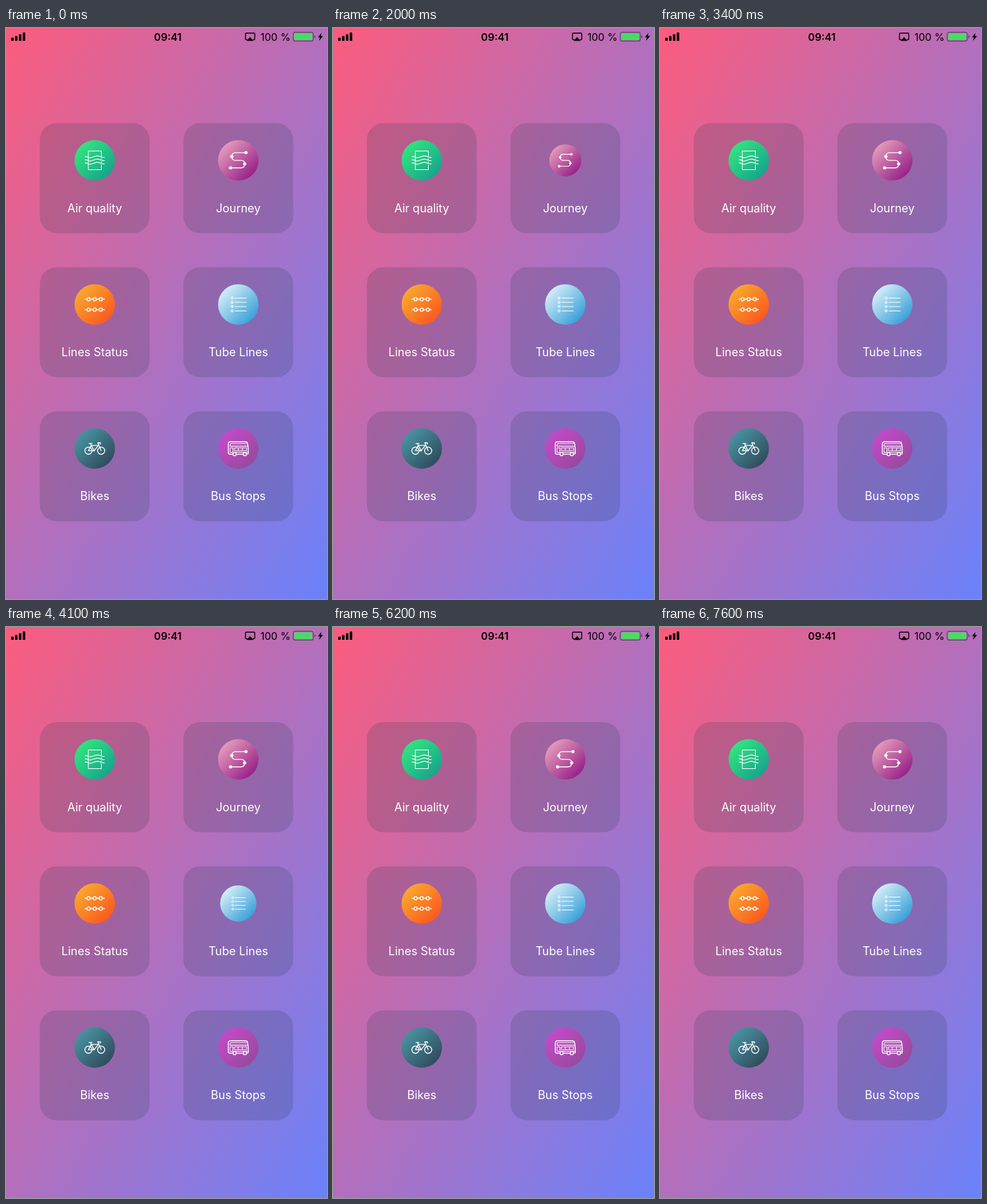
Write an HTML page that moves like this. It is 500x889 px and loops after 7.7 s.

```html
<!DOCTYPE html>
<html lang="en">
<head>
<meta charset="utf-8">
<title>Transport menu</title>
<style>
  html, body { margin: 0; width: 100%; height: 100%; overflow: hidden; }
  svg { display: block; width: 100vw; height: 100vh; }
  text { font-family: Inter, Roboto, sans-serif; }
  .label { font-size: 18px; fill: #fff; text-anchor: middle; }
  .status { font-size: 16px; }
  .icon { fill: none; stroke: #fff; stroke-width: 1.4; stroke-linecap: round; stroke-linejoin: round; }
  .icon .solid { fill: #fff; stroke: none; }
  .icon .thin { stroke-width: 1.05; }
</style>
</head>
<body>
<svg id="stage" viewBox="0 0 500 889" preserveAspectRatio="none">
  <defs id="defs"></defs>
  <rect width="500" height="889" fill="url(#sky)"/>
  <g id="signal"></g>
  <text class="status" x="252" y="19.6" text-anchor="middle" font-weight="600">09:41</text>
  <g fill="none" stroke="#000" stroke-width="1.4" stroke-linejoin="round">
    <path d="M376 18.3H374.3Q373 18.3 373 17V9.3Q373 8 374.3 8H386.2Q387.5 8 387.5 9.3V17Q387.5 18.3 386.2 18.3H384.5"/>
    <path d="M380.2 14.5L385 19.8H375.4Z" fill="#000" stroke-width=".7"/>
  </g>
  <text class="status" x="419.7" y="19.6" text-anchor="middle">100 %</text>
  <rect x="447.4" y="6.6" width="31.2" height="13.8" rx="3" fill="none" stroke="#5a3f68" stroke-width="1.1"/>
  <rect x="449" y="8.2" width="28" height="10.6" rx="1.7" fill="#4cd964"/>
  <path d="M480.2 11.2Q482 11.8 482 13.5T480.2 15.8Z" fill="#5a3f68"/>
  <path d="M491.6 7.5L485.8 14.4H489L487.6 20L493.8 12.6H490.3Z"/>
  <g id="tiles"></g>
</svg>
<script>
const LOOP = 7700, STEP = 100;
const FIRST_TAP = 930, TAP_GAP = 900, TAP_LENGTH = 580, TAP_DEPTH = 0.33;

const path = (d, extra = '') => `<path d="${d}" ${extra}/>`;
const circle = (x, y, r, extra = '') => `<circle cx="${x}" cy="${y}" r="${r}" ${extra}/>`;
const dot = (x, y) => circle(x, y, 2.5, 'class="solid"');
const gradient = (id, from, to) =>
  `<linearGradient id="${id}" x1="0" y1="0" x2="1" y2="1">
    <stop stop-color="${from}"/><stop offset="1" stop-color="${to}"/></linearGradient>`;

const wave = y => path(`M-15 ${y}C-11 ${y} -10 ${y + 2} -7 ${y + 2}S0 ${y - 1} 4 ${y - 1}S10 ${y + 2} 15 ${y + 1.5}`);
const station = (x, y) => circle(x, y, 2.5);
const statusRow = y =>
  path(`M-15 ${y}H-12M-7 ${y}H-2.5M2.5 ${y}H7M12 ${y}H15`) +
  [-9.5, 0, 9.5].map(x => station(x, y)).join('');
const listRow = y => circle(-9.6, y, 1.6) + path(`M-5.5 ${y}H12.5`);

const icons = {
  air: `<g class="thin">${path('M-10 -7V-14.7H10.3V-6M-10 -1V1M-10 7V14.3H10.3V7')}
    ${path('M-10 -7V7M10.3 -3V-1M10.3 2V4')}${[-6, -1, 4].map(wave).join('')}</g>`,
  journey: path('M12 -12H-4.5Q-10 -12 -10 -6Q-10 0 -4.5 0H4.5Q10 0 10 5.5Q10 11.6 4.5 11.6H-12') +
    dot(12, -12) + dot(-10, -6) + dot(10, 5.5) + dot(-12, 11.6),
  status: statusRow(-8.2) + statusRow(8.1),
  list: `<g class="thin">${[-10, -3.4, 3.3, 10].map(listRow).join('')}</g>`,
  bike: circle(-9.8, 3.4, 5.6) + circle(10, 3.4, 5.6) +
    path('M-9.8 3.4L-5.5 -4.8H5.8L-1 3.4H-9.8M-1 3.4L-6.5 -7.5M-9 -7.8H-4.2M10 3.4L4.8 -9H8.2Q9.6 -8.5 8.8 -6.8') +
    circle(-1, 3.4, 1.2, 'class="solid"'),
  bus: path('M-8.5 8.8H-13.5Q-15.5 8.8 -15.5 6.8V-7Q-15.5 -10.5 -12 -10.5H11.5Q14 -10.5 14.6 -7.5L15.6 0V7Q15.6 8.8 13.6 8.8M-2.8 8.8H7.4') +
    `<g class="thin">${path('M-12.8 -3.6V-5.7Q-12.8 -7.8 -10.8 -7.8H13.5M-12.8 -3.6H14.5M-12.8 -1H-8.3V6H-12.8ZM-6 -1H13V3.2H-6ZM0 -1V3.2M6.5 -1V3.2M-6 5.7H15')}</g>` +
    circle(-5.7, 8.7, 2.5) + circle(10.3, 8.7, 2.5)
};

const tiles = [
  ['Air quality', 'air', '#38ef7d', '#11998e'],
  ['Journey', 'journey', '#f2b2c4', '#89097f'],
  ['Lines Status', 'status', '#f7b733', '#fc4a1a'],
  ['Tube Lines', 'list', '#f2fcfe', '#1c92d2'],
  ['Bikes', 'bike', '#4ca1af', '#2c3e50'],
  ['Bus Stops', 'bus', '#c94bd0', '#914996']
];
const center = i => ({ x: i % 2 ? 361.8 : 138.2, y: 206.1 + Math.floor(i / 2) * 224.3 });

function build() {
  const byId = id => document.getElementById(id);
  byId('defs').innerHTML = gradient('sky', '#fc5c7d', '#6a82fb') +
    tiles.map(([, id, from, to]) => gradient(id, from, to)).join('');
  byId('signal').innerHTML = [5, 7.5, 10.2, 13].map((h, i) =>
    `<rect x="${8 + i * 6}" y="${20 - h}" width="4" height="${h}" rx="1"/>`).join('');
  byId('tiles').innerHTML = tiles.map(([label, id], i) => {
    const { x, y } = center(i);
    return `<rect x="${x - 85.5}" y="${y - 58}" width="171" height="171.3" rx="26" fill="#2c3e50" fill-opacity=".2"/>
      <g class="badge">${circle(0, 0, 31.5, `fill="url(#${id})"`)}<g class="icon">${icons[id]}</g></g>
      <text class="label" x="${x}" y="${y + 80.6}">${label}</text>`;
  }).join('');
}

function tapScale(time, i) {
  const u = (time - FIRST_TAP - i * TAP_GAP) / TAP_LENGTH;
  return u > 0 && u < 1 ? 1 - TAP_DEPTH * Math.sin(Math.PI * u) ** 2 : 1;
}

build();
const badges = document.querySelectorAll('.badge');
const start = performance.now();

function draw(now) {
  const elapsed = Math.max(0, now - start) % LOOP;
  const time = Math.floor(elapsed / STEP) * STEP;
  badges.forEach((badge, i) => {
    const { x, y } = center(i);
    badge.setAttribute('transform', `translate(${x} ${y}) scale(${tapScale(time, i)})`);
  });
  requestAnimationFrame(draw);
}
draw(start);
</script>
</body>
</html>
```
